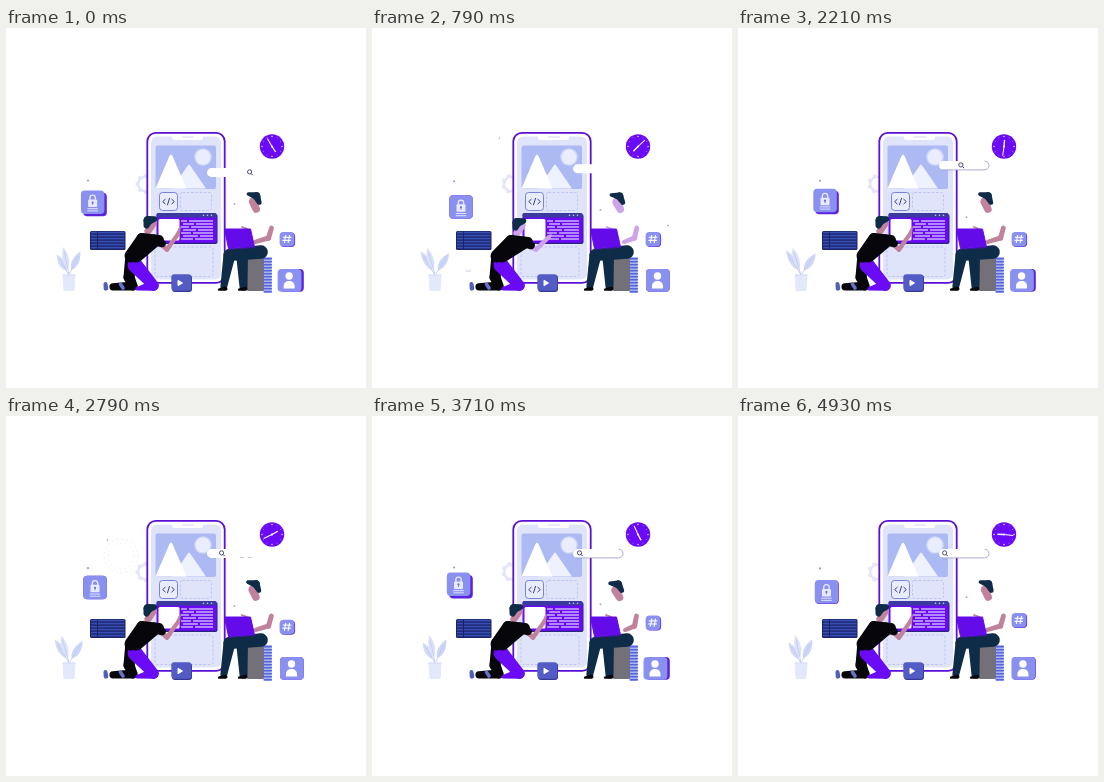
Write an HTML page with a canvas that moves like this. It is 360x360 px and loops after 5000 ms.

```html
<!DOCTYPE html>
<html lang="en">
<head>
<meta charset="utf-8">
<style>
html, body { margin: 0; width: 100%; height: 100%; overflow: hidden; background: #fff; }
canvas { display: block; width: 360px; height: 360px; }
</style>
</head>
<body>
<canvas id="stage"></canvas>
<script>
const canvas = document.getElementById('stage');
const scale = window.devicePixelRatio || 1;
canvas.width = canvas.height = 360 * scale;
const c = canvas.getContext('2d');
const LOOP = 5000, FPS = 14, TAU = Math.PI * 2;
const VIOLET = '#6a0af6', NAVY = '#0e2c48', BLACK = '#07070b', PALE = '#dfe4fb', LILAC = '#8990ef';

// Drawing helpers
function paint(fill, stroke, width = 1) {
  if (fill) { c.fillStyle = fill; c.fill(); }
  if (stroke) { c.strokeStyle = stroke; c.lineWidth = width; c.stroke(); }
}
function box(x, y, w, h, r, fill, stroke, width) {
  c.beginPath();
  c.roundRect(x, y, w, h, r);
  paint(fill, stroke, width);
}
function disc(x, y, r, fill, stroke, width) {
  c.beginPath();
  c.arc(x, y, r, 0, TAU);
  paint(fill, stroke, width);
}
function trace(points) {
  c.beginPath();
  points.forEach(([x, y]) => c.lineTo(x, y));
}
function shape(fill, ...points) {
  trace(points);
  c.closePath();
  paint(fill, fill, 1);
}
function line(color, width, ...points) {
  trace(points);
  paint(null, color, width);
}
function dashed(dash, draw) {
  c.setLineDash(dash);
  draw();
  c.setLineDash([]);
}
function faded(alpha, draw) {
  if (alpha <= 0) return;
  c.globalAlpha = alpha;
  draw();
  c.globalAlpha = 1;
}
function at(x, y, angle, draw) {
  c.save();
  c.translate(x, y);
  c.rotate(angle);
  draw();
  c.restore();
}
// A chain of tapered capsules through [x, y, radius] joints.
function limb(color, ...joints) {
  for (let i = 1; i < joints.length; i++) {
    const [x0, y0, r0] = joints[i - 1], [x1, y1, r1] = joints[i];
    const dir = Math.atan2(y1 - y0, x1 - x0);
    const tilt = Math.acos((r0 - r1) / Math.hypot(x1 - x0, y1 - y0));
    c.beginPath();
    c.arc(x0, y0, r0, dir + tilt, dir - tilt + TAU);
    c.arc(x1, y1, r1, dir - tilt, dir + tilt);
    paint(color);
  }
}

// Timing helpers
function ramp(t, from, to) {
  const k = Math.min(1, Math.max(0, (t - from) / (to - from)));
  return k * k * (3 - 2 * k);
}
const pulse = (t, from, to, fade) => ramp(t, from, from + fade) - ramp(t, to - fade, to);
const flicker = t => pulse(t, 2450, 3150, 250);

function gear(t) {
  at(139.5, 156, t / 1800, () => {
    disc(0, 0, 7.3, null, '#e3e5fa', 2.4);
    for (let i = 0; i < 8; i++) {
      c.rotate(TAU / 8);
      box(-1.8, -10, 3.6, 3, 0.8, '#e3e5fa');
    }
  });
  faded(flicker(t), () => dashed([2, 3], () => {
    disc(115, 140, 17, null, '#eeeef6');
    disc(115, 140, 13, null, '#f1f1f8');
  }));
}

function mountain(x, top, spread, color) {
  const base = 160.5, half = spread / 2;
  c.beginPath();
  c.moveTo(x - half, base);
  c.lineTo(x - 1.5, top + 2);
  c.quadraticCurveTo(x, top - 1, x + 1.5, top + 2);
  c.lineTo(x + half, base);
  paint(color);
}

function phone() {
  box(141.3, 104.8, 77.4, 150, 8.5, '#fff', '#5c0fd6', 1.8);
  box(145, 108.5, 70, 143, 6, PALE);
  box(166, 106.5, 31, 5.5, 2.5, '#fff');
  line('#c9cdee', 0.8, [176, 109], [188, 109]);
  box(149.5, 117.5, 60.5, 43.5, 2, '#adb9f3');
  disc(197, 129, 8.8, '#cfd7f8');
  disc(197, 129, 7.4, '#e9edfd');
  mountain(183, 136, 34, '#eef1fe');
  mountain(165, 126, 31, '#fff');
  box(153.5, 164.5, 18, 18, 3, '#e9ecfd', '#6f78d6', 0.9);
  for (const side of [-1, 1]) {
    line('#39418f', 1, [162.5 + side * 3, 171], [162.5 + side * 5.8, 173.6], [162.5 + side * 3, 176.2]);
  }
  line('#39418f', 1, [163.6, 170], [161.4, 177.2]);
  dashed([2.5, 1.8], () => {
    box(174.5, 164.5, 31, 18, 2, null, '#b5bceb', 0.8);
    box(149, 219, 58, 29.5, 2, null, '#b5bceb', 0.8);
  });
}

function codeWindow() {
  box(151.5, 186, 60, 30, 2, '#2d2480');
  box(150.5, 185, 60, 29.7, 2, VIOLET);
  box(150.5, 185, 60, 4.5, 2, '#3b3a9e');
  for (let i = 0; i < 3; i++) disc(197.5 + i * 4, 187.2, 0.8, '#c6cafa');
  box(152.5, 191, 21, 21.5, 1.5, '#fff');
  for (let row = 0; row < 7; row++) {
    const y = 193 + row * 3, split = 181 + (row * 7) % 12;
    line('#dccdff', 1.3, [175 + row % 2 * 2, y], [split, y]);
    line('#dccdff', 1.3, [split + 2, y], [207, y]);
  }
}

function searchBar(t) {
  const x = 244 - 37 * ramp(t, 0, 4100);
  const y = 144.5 - 7 * ramp(t, 0, 1500);
  const r = 4.4, right = 251 - r;
  box(201, y - r, 50, r * 2, r, '#fff');
  faded(0.85 * ramp(t, 790, 1300) * (1 - flicker(t)), () => {
    c.beginPath();
    c.moveTo(204, y + r);
    c.lineTo(right, y + r);
    c.arc(right, y, r, Math.PI / 2, -Math.PI / 2, true);
    paint(null, '#8587bb', 0.8);
  });
  faded(1 - pulse(t, 200, 1300, 350), () => {
    disc(x - 0.4, y - 0.6, 2.1, null, '#393b65', 0.9);
    line('#393b65', 1, [x + 1.2, y + 1], [x + 2.8, y + 2.7]);
  });
}

function clock(t) {
  at(266, 118.5, 0, () => {
    disc(0, 0, 12.2, VIOLET);
    for (let i = 0; i < 12; i++) {
      c.rotate(TAU / 12);
      disc(0, -10, i % 3 === 2 ? 0.8 : 0.4, '#d8c8ff');
    }
    c.rotate((t * 0.0985 - 30) * TAU / 360);
    line('#fff', 1, [0, 0], [0, -9.3]);
    line('#fff', 1.3, [0, 0], [0.4, 6.6]);
    disc(0, 0, 1, '#fff');
  });
}

// Front plate slides away from its fixed backing and returns.
function tile(x, y, w, h, dx, dy, icon) {
  box(x, y, w, h, 4, '#5a22dc');
  at(x - dx, y - dy, 0, () => {
    box(0, 0, w, h, 4, LILAC);
    icon();
  });
}
function lockIcon() {
  box(9, 4.7, 5.4, 8, 2.7, null, '#e8eaff', 1.3);
  box(7.2, 9, 9, 7.5, 1, '#e8eaff');
  disc(11.7, 12, 1.1, '#6870d0');
  line('#6870d0', 0.8, [11.7, 12], [11.7, 14.5]);
  for (const y of [18.2, 20.4]) line('#dfe2ff', 1, [6.5, y], [17, y]);
}
function userIcon() {
  disc(11.5, 7, 3.7, '#fff');
  box(6, 12, 11, 7.5, [5, 5, 0.5, 0.5], '#fff');
}
function hashIcon() {
  for (const d of [0, 3.8]) {
    line('#fff', 1.1, [6.2 + d, 3], [4.7 + d, 11]);
    line('#fff', 1.1, [3.2 - d / 8, 5.3 + d * 0.8], [11.8 - d / 8, 5.3 + d * 0.8]);
  }
}
function tiles(t) {
  const shift = 2.5 * Math.abs(Math.sin(Math.PI * (t - 790) / 2000));
  const float = 161.6 + 4.4 * Math.sin(TAU * (t + 350) / LOOP);
  tile(77.3, float + 1.4, 23.5, 23.5, shift, shift, lockIcon);
  tile(274, 241, 23.8, 22.7, shift, 0, userIcon);
  tile(274.3, 204.6 - 7 * ramp(t, 2600, 4500), 14.8, 14.4, 0.7, 0.6, hashIcon);
}

function terminal() {
  box(84, 203, 35.5, 19, 1.5, '#1c2168');
  for (let row = 0; row < 6; row++) {
    const y = 204.6 + row * 3;
    line('#3450b4', 1.7, [85, y], [91, y]);
    line('#3450b4', 1.7, [92, y], [118.5, y]);
  }
}

function playButton() {
  box(166, 247, 20, 17, 3, '#343895');
  box(165.3, 246.2, 20, 16.6, 3, '#535bc5');
  shape('#fff', [172, 252.3], [172, 257.7], [176.5, 255]);
}

function leaf(length, width, angle, color) {
  at(63, 247, angle, () => {
    c.beginPath();
    c.moveTo(0, -length);
    c.bezierCurveTo(width, -length + 8, width, -length * 0.4, 0, -length * 0.2);
    c.bezierCurveTo(-width, -length * 0.4, -width, -length + 8, 0, -length);
    paint(color);
    line('#c0caf1', 0.8, [0, 0], [0, -length + 5]);
  });
}
function plant(t) {
  const sway = pulse(t, 0, 3500, 1100);
  leaf(24 + sway * 5, 4.2, -0.54, '#d2daf8');
  leaf(28.5, 4.2, -0.2 - sway * 0.1, '#dce2fb');
  leaf(26, 4.6, 0.45 + sway * 0.15, '#cdd6f7');
  shape('#e4e8fb', [57, 247], [69, 247], [68, 262.5], [58, 262.5]);
  line('#d6dcf7', 1, [56.5, 247], [69.5, 247]);
}

function kneelingMan(lean, skin) {
  const dx = lean * 3, dy = lean * 2, handX = 172 + lean * 5, handY = 206 + lean * 3;
  limb(BLACK, [125, 232, 6], [123, 249, 5.5], [127, 258, 4.5], [107, 258.8, 3.6]);
  limb('#5060b8', [99.5, 256, 2], [100, 260.3, 2.3]);
  limb('#6573cc', [114.5, 256.2, 1.8], [117, 260, 1.8]);
  limb(VIOLET, [129, 237, 7.5], [147.5, 257.5, 5.2], [131, 260.8, 1.8]);
  at(dx, dy, 0, () => {
    limb(skin, [147, 195.5, 3.6], [142, 203, 3.6]);
    limb(NAVY, [148.5, 191, 2.8], [142, 192.5, 4.5], [140.5, 197.5, 3]);
  });
  limb(BLACK, [153 + dx, 212 + dy, 5], [136 + dx, 210.5 + dy, 5.5], [125, 228, 6.5]);
  limb(BLACK, [148 + dx, 213 + dy, 6.5], [130, 226.5, 8]);
  limb(skin, [156 + dx, 217 + dy, 2.4], [161 + dx, 221.5, 2.3], [handX, handY, 2], [handX + 2, handY - 7 + lean * 5, 0.8]);
  limb(BLACK, [148 + dx, 212 + dy, 5], [156 + dx, 215.5 + dy, 3.8]);
}

function seat() {
  box(241, 229, 17, 34, 1, '#737177');
  for (let y = 229.5; y < 263; y += 3) box(257.5, y, 8.5, 2.3, 0.8, '#5566de');
}

function sittingMan(t, skin) {
  const rock = Math.sin(Math.PI * t / 2500) ** 2;
  limb(NAVY, [255, 224, 6.8], [223.5, 227, 6], [217.8, 258.5, 3.4]);
  limb(NAVY, [236, 225.5, 6], [237.5, 258.5, 4]);
  limb(BLACK, [213, 261.6, 1.2], [219.5, 260.8, 2]);
  limb(BLACK, [233, 261.6, 1.2], [239.5, 260.8, 2]);
  at(249 - rock * 3.4, 175 + rock * 0.5, -rock * 0.12, () => {
    limb(skin, [-2, -1.5, 4.2], [1.2, 6, 3.8]);
    limb(NAVY, [-6.5, -9, 1.8], [1.5, -7, 3.8], [4.2, -0.5, 2.4]);
  });
  limb(skin, [265.5 - rock, 200, 2.4], [262.5, 210, 2.6], [249 + rock * 4, 214, 2]);
  limb(skin, [236 - rock * 2, 199, 0.9], [241 - rock * 2, 201, 1]);
  shape('#630be8', [218.5, 201], [244.5, 201], [248.5, 218.8], [222.5, 220.6]);
  line('#3e18a0', 1, [222.5, 221.3], [248.8, 219.5]);
}

function specks(t) {
  disc(82, 152.5 + Math.sin(t / 800), 1.1, '#969df0');
  disc(228.5, 176 + 14 * Math.sin(Math.PI * t / 5600), 1, '#a9aae8');
  faded(pulse(t, 300, 2000, 400), () => {
    disc(127.5, 110, 0.8, '#8faadb');
    disc(296, 197.5, 0.8, '#8488df');
    line('#b8bde8', 0.8, [94, 243], [99, 243]);
  });
  faded(flicker(t), () => {
    disc(101.5, 124, 0.8, '#8d95c9');
    for (const x of [234, 242]) line('#b5b8d8', 0.8, [x, 141.5], [x + 4, 141.5]);
  });
}

function render(t) {
  c.setTransform(scale, 0, 0, scale, 0, 0);
  c.fillStyle = '#fff';
  c.fillRect(0, 0, 360, 360);
  c.lineJoin = 'round';
  const lean = pulse(t, 0, 2150, 650);
  const skin = `rgb(${192 + lean * 13}, ${130 + lean * 34}, ${156 + lean * 78})`;
  gear(t);
  phone();
  codeWindow();
  searchBar(t);
  clock(t);
  tiles(t);
  terminal();
  plant(t);
  kneelingMan(lean, skin);
  playButton();
  seat();
  sittingMan(t, skin);
  specks(t);
}

const start = performance.now();
function tick() {
  const t = (performance.now() - start) % LOOP;
  render(Math.floor((t + 4) * FPS / 1000) * 1000 / FPS % LOOP);
  requestAnimationFrame(tick);
}
tick();
</script>
</body>
</html>
```
